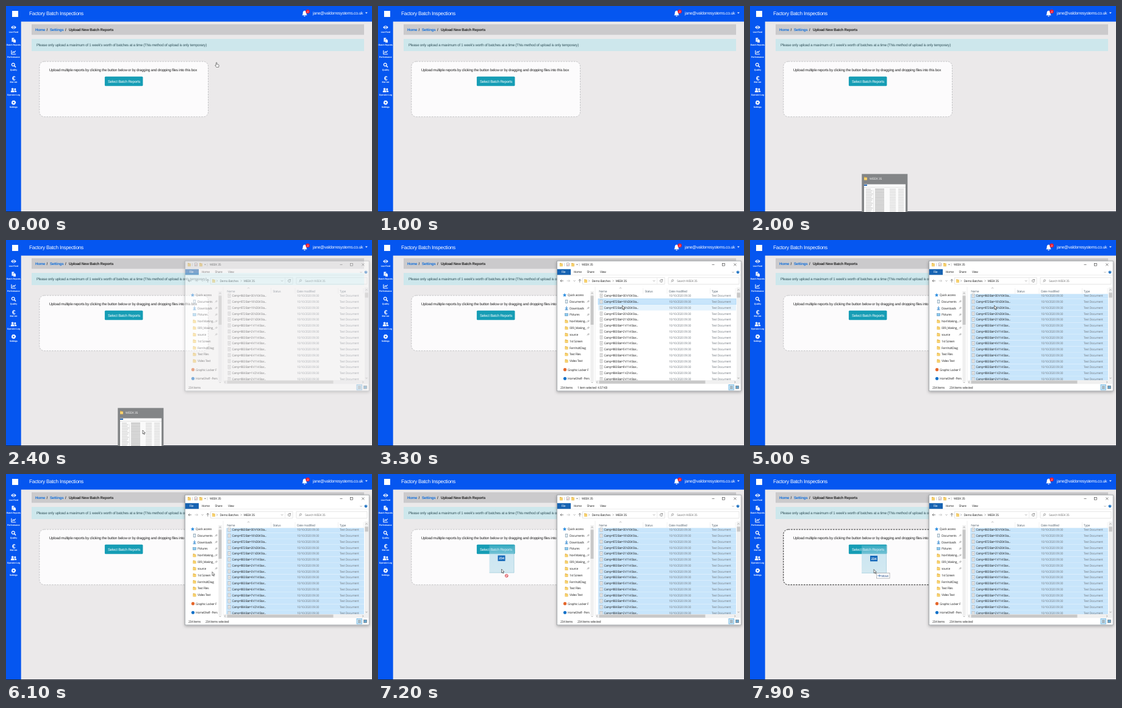
An HTML page for the animation above (8 s loop, 600 by 338 pixels).

```html
<!DOCTYPE html>
<html lang="en">
<head>
<meta charset="utf-8">
<title>Batch report upload</title>
<style>
html, body { margin: 0; width: 100%; height: 100%; overflow: hidden; background: #ebe9ea; }
svg { display: block; width: 600px; height: 338px; }
text { font-family: "Liberation Sans", Arial, sans-serif; letter-spacing: -.035em; text-rendering: geometricPrecision; white-space: pre; }
#explorer text { font-family: "Open Sans", "Noto Sans", sans-serif; letter-spacing: -.056em; }
#explorer .name { letter-spacing: -.085em; }
</style>
</head>
<body>
<svg id="stage" viewBox="0 0 600 338"></svg>
<script>
const LOOP = 8000, BLUE = '#0556f0', TEAL = '#169db5', FOLDER = '#f7d370';
const FIRST_ROW = 91.5, ROW_STEP = 9.75;

const text = (x, y, s, size, fill = '#222', more = '') =>
  `<text x="${x}" y="${y}" font-size="${size}" fill="${fill}" ${more}>${s}</text>`;
const rect = (x, y, w, h, fill, more = '') =>
  `<rect x="${x}" y="${y}" width="${w}" height="${h}" fill="${fill}" ${more}/>`;
const line = (d, color, w = .6, more = '') =>
  `<path d="${d}" fill="none" stroke="${color}" stroke-width="${w}" ${more}/>`;
const shape = (d, fill, more = '') => `<path d="${d}" fill="${fill}" ${more}/>`;
const dot = (x, y, r, fill, more = '') => `<circle cx="${x}" cy="${y}" r="${r}" fill="${fill}" ${more}/>`;
const group = (id, body, more = '') => `<g id="${id}" ${more}>${body}</g>`;
const at = (x, y, body) => `<g transform="translate(${x} ${y})">${body}</g>`;
const body = (x, y, s, fill = '#222', more = '') => text(x, y, s, 6.1, fill, more);
const small = (x, y, s, fill = '#222') => text(x, y, s, 5, fill);
const folder = (x, y) =>
  shape(`M${x - 2.4} ${y - 2.6}h2l.6 .8h2.2v4.6h-4.8z`, '#e3b044') + rect(x - 2.4, y - 1.2, 4.8, 3.6, FOLDER);
const chevron = (x, y, d = 1) => line(`M${x - 1.5} ${y - d * .7}l1.5 ${d * 1.5}l1.5 ${-d * 1.5}`, '#555', .5);

// Sidebar icons, drawn around 0,0
const icons = [
  shape('M-4.3 0Q0-5.6 4.3 0Q0 5.6-4.3 0z', '#fff') + dot(0, 0, 1.9, BLUE) + dot(0, 0, 1.1, '#fff'),
  shape('M-3-3.8h3.8v1.6h-1.6v5h-2.2z', '#fff') + shape('M-.4-1.6h2.3l1.5 1.5v4h-3.8z', '#fff'),
  line('M-3.5-3.2v6.2h7.2M-2 1l1.6-2l1.4 1.2l2.2-2.7', '#fff', 1.1),
  line('M1 .9l2.6 2.7', '#fff', 1.5) + dot(-.7, -.8, 2.4, 'none', 'stroke="#fff" stroke-width="1.2"'),
  text(0, 3.6, '€', 10, '#fff', 'text-anchor="middle" font-weight="bold"'),
  dot(-1.8, -1.8, 1.8, '#fff') + dot(2.4, -1.6, 1.5, '#fff') +
    shape('M-4.6 3.6v-1.3q0-2 2-2h1.6q2 0 2 2v1.3zM1.6 3.2v-1.2q0-1-.6-1.6h2q1.7 0 1.7 1.7v1.1z', '#fff'),
  dot(0, 0, 2.9, '#fff', 'stroke="#fff" stroke-width="1.6" stroke-dasharray="1.5 .78"') + dot(0, 0, 1.2, BLUE)
];
const labels = ['Live Feed', 'Batch Reports', 'Performance', 'Quality', 'Mat Vat', 'Operator Log', 'Settings'];

function page() {
  const bold = 'font-weight="bold"', centred = 'text-anchor="middle"';
  return rect(0, 0, 600, 338, '#ebe9ea') +
    rect(0, 0, 24.7, 338, BLUE) + rect(0, 0, 600, 25.6, BLUE) + rect(0, 337, 600, 1, '#222936') +
    rect(10, 8, 10, 10, '#fff') +
    text(38, 14.8, 'Factory Batch Inspections', 8.4, '#fff') +
    shape('M485.2 15.2q1.5-1.2 1.5-4.2q0-2.8 2.8-3.4q2.8 .6 2.8 3.4q0 3 1.5 4.2zM488 16h3q-1.5 2.6-3 0z', '#fff') +
    dot(494.6, 9, 3.3, '#ec1c30') + text(494.6, 10.6, '2', 4.5, '#fff', centred) +
    text(503, 14.3, 'jane@valdorresystems.co.uk', 6.9, '#fff') +
    shape('M588.8 10.4h4l-2 2.2z', '#fff') +
    icons.map((icon, i) => at(12.5, [35, 56, 76, 97, 118, 138, 158.5][i], icon) +
      text(12.4, 44.4 + i * 20.5, labels[i], 3.6, '#fff', centred + ' font-weight="bold"')).join('') +
    rect(42, 30, 545, 17.3, '#cbcacc') +
    body(48, 40.7, 'Home', '#1470da', bold) + body(66.4, 40.7, '/', '#333', bold) +
    body(72, 40.7, 'Settings', '#1470da', bold) + body(97, 40.7, '/', '#333', bold) +
    body(103, 40.7, 'Upload New Batch Reports', '#252525', bold) +
    rect(42, 54, 545, 20, '#cde7ec') +
    body(50, 66, "Please only upload a maximum of 1 week's worth of batches at a time (This method of upload is only temporary)", '#33535b') +
    rect(54.8, 91, 276.7, 90.8, '#fcfbfc', 'id="drop" rx="8" stroke-width="1" stroke-dasharray="2.6 1.7"') +
    body(70.8, 106.7, 'Upload multiple reports by clicking the button below or by dragging and dropping files into this box') +
    rect(161.9, 115.7, 62.5, 15.5, TEAL, 'rx="1.5"') +
    body(167, 125.9, 'Select Batch Reports', '#fff');
}

function preview() {
  let out = rect(183.3, 275.6, 75, 63, '#838587') + folder(189.5, 283) +
    text(196, 285, 'WEEK 35', 4.9, '#f2f2f2') + rect(187, 292.5, 68, 46, '#fafafa') +
    rect(187, 293, 5, 2, '#2667b5') + rect(187, 297, 68, .5, '#ccc') + rect(202.5, 302, .4, 36, '#ccc');
  for (let y = 300; y < 337; y += 2.6) {
    out += rect(190, y, 8 + y % 4, .8, '#bbb') + rect(205, y, 15, 1, '#999') +
      rect(229, y, 10, .8, '#c4c4c4') + rect(243, y, 9, .8, '#c4c4c4');
  }
  return out;
}

function fileName(i) {
  const [camp, bat, vat] = i == 0 ? [860, 30, 104] : i < 5 ? [872, 17 + i, 204] :
    i < 13 ? [883, i - 4, 114] : [884, i - 12, i == 13 ? 214 : 114];
  return `Camp=${camp} Bat=${bat} V${vat} Sta${bat < 10 ? 'r' : ''}...`;
}

function fileList() {
  let out = '';
  for (let i = 0; i < 15; i++) {
    const y = FIRST_ROW + i * ROW_STEP, top = i ? y - 4.8 : 88.5;
    out += rect(361, top, 226, y + 4.7 - top, '#fff', 'class="row" stroke-width=".5"') +
      rect(364, y - 2.8, 4, 5.6, '#f8f8f8', 'stroke="#999" stroke-width=".5"') +
      line(`M365 ${y - 1.2}h2m-2 1.2h2m-2 1.2h2`, '#999', .4) +
      text(370.5, y + 1.8, fileName(i), 4.95, '#222', 'class="name"') +
      small(477, y + 1.8, '10/10/2020 09:30', '#747b82') + small(547, y + 1.8, 'Text Document', '#747b82');
  }
  return out;
}

function navPane() {
  const names = ['Documents', 'Downloads', 'Pictures', 'No4 Making...', '009_Making_', 'source',
    '1st Screen', 'FernholtDiag', 'Text Files', 'Video Text'];
  const symbols = [
    (x, y) => rect(x - 1.8, y - 2.6, 3.6, 5.2, '#e8f0f6', 'stroke="#68889d" stroke-width=".6"'),
    (x, y) => line(`M${x} ${y - 2.8}v4.2m-2-2l2 2l2-2M${x - 2.4} ${y + 2.6}h4.8`, '#1979ca', 1),
    (x, y) => rect(x - 2.6, y - 2, 5.2, 4, '#8cc8ee', 'stroke="#4c87ad" stroke-width=".5"')
  ];
  const pin = y => line(`M342.8 ${y + 1.6}l1.4-1.4m-.8-1.2l2 2m-1.4-1.6l1.4-1.2l1 1l-1.2 1.4`, '#777', .6);
  return shape('M306 87l.9 2.2l2.3 .2l-1.8 1.5l.6 2.3l-2-1.3l-2 1.3l.6-2.3l-1.8-1.5l2.3-.2z', '#2b8de0') +
    small(310.8, 92, 'Quick access') +
    names.map((name, i) => {
      const y = 101 + i * 10.82;
      return (symbols[i] || folder)(309, y) + small(314, y + 1.8, name) + (i < 6 ? pin(y) : '');
    }).join('') +
    dot(306.5, 212.7, 2.6, '#e5672c') + small(311, 214.5, 'Graphic Locker F') +
    dot(306.5, 227.3, 2.6, '#1673c9') + small(311, 229.1, 'HomeShelf - Pers') +
    rect(348.3, 84, 5.4, 148, '#f0f0f0') + rect(348.5, 91.5, 5, 47.5, '#c8c8c8') +
    chevron(351, 87.5, -1) + chevron(351, 233.5);
}

function explorer() {
  const frame = 'stroke="#d5d5d5" stroke-width=".6"';
  return rect(293.5, 34.3, 301.7, 213.5, '#fff', 'stroke="#8f9499" stroke-width=".7" filter="url(#shadow)"') +
    at(0, -.6, folder(300.3, 41) + line('M305.5 38.5v5M330 38.5v5', '#aaa', .5) +
      rect(309.5, 38.4, 4, 5, '#fff', 'stroke="#777" stroke-width=".5"') + line('M310.3 41l1 1l1.6-2', '#c33', .6) +
      folder(319.5, 41) + shape('M325 40.3h2.8l-1.4 1.6z', '#555') + small(334, 43, 'WEEK 35') +
      line('M547.5 41h4M583.3 39l4 4m0-4l-4 4', '#333', .6) +
      rect(564.5, 39, 3.8, 3.8, 'none', 'stroke="#333" stroke-width=".6"')) +
    rect(293.8, 47.8, 22.2, 9.6, '#1763b2') + small(300.5, 54.4, 'File', '#fff') +
    small(320.7, 54.4, 'Home') + small(342.5, 54.4, 'Share') + small(364, 54.4, 'View') +
    chevron(582, 52.8) + dot(590, 52.8, 2.4, '#1a6fc0') + text(590, 54.4, '?', 4.3, '#fff', 'text-anchor="middle"') +
    rect(294, 57.4, 301, .5, '#dadada') +
    line('M304 67h-5m2-2l-2 2l2 2', '#333', .6) + line('M309.5 67h5m-2-2l2 2l-2 2', '#aaa', .6) +
    chevron(322, 67) + line('M330.8 69.6v-5m-2 2l2-2l2 2', '#333', .6) +
    rect(335.5, 61.8, 134.5, 10.5, '#fff', frame) + folder(340.5, 67) +
    line('M345.2 65.5l1.5 1.5l-1.5 1.5M384.8 65.5l1.5 1.5l-1.5 1.5', '#555', .5) +
    small(350.5, 68.8, 'Demo Batches') + small(389.5, 68.8, 'WEEK 35') + chevron(452.5, 67) +
    line('M457.5 62v10', '#ddd', .5) + line('M466 65.6a2.1 2.1 0 1 0 .5 1.8M466.4 64.3v1.7h-1.7', '#444', .6) +
    rect(476, 61.8, 116, 10.5, '#fff', frame) + dot(483, 66.4, 1.5, 'none', 'stroke="#555" stroke-width=".5"') +
    line('M482 67.5l-1.6 1.6', '#555', .6) + small(490, 68.8, 'Search WEEK 35', '#777') +
    line('M356 77v156', '#ddd', .5) + chevron(397.5, 78.8, -1) +
    ['Name', 'Status', 'Date modified', 'Type'].map((s, i) => small([362.3, 437.5, 477, 547][i], 85.6, s, '#53616e')).join('') +
    line('M434.5 79v9M474 79v9M544.5 79v9M586 79v9', '#e0e0e0', .5) +
    navPane() + fileList() +
    rect(588, 78, 6.4, 152, '#f0f0f0') + rect(588.4, 86.5, 5.4, 8, '#c8c8c8') +
    chevron(591, 82, -1) + chevron(591, 226.5) +
    rect(357, 230, 237, 6.2, '#f0f0f0') + rect(362.5, 230.6, 174, 5, '#c8c8c8') +
    line('M359.8 231.7l-1.4 1.5l1.4 1.5M584.4 231.7l1.4 1.5l-1.4 1.5', '#555', .5) +
    small(299, 243.8, '234 items') + `<text id="status" x="327" y="243.8" font-size="5" fill="#222"></text>` +
    rect(575, 237.4, 8.6, 8.6, '#cce8f8', 'stroke="#3d9bd8" stroke-width=".6"') +
    line('M577 240h4.8m-4.8 1.8h4.8m-4.8 1.8h4.8', '#555', .6) +
    rect(586.5, 239.2, 4.8, 4.8, '#69a6cf', 'stroke="#555" stroke-width=".5"');
}

const dragImage = rect(-20, -39.5, 40.5, 45.5, 'url(#glass)') + line('M-20 6h40.5v-45.5', '#8fc3d6', .6) +
  rect(-6, -22.4, 12, 9.2, '#1267b9') + text(0, -16, '234', 5.4, '#fff', 'text-anchor="middle" font-weight="bold"');
const noDrop = dot(8.3, 11, 2.3, '#fff', 'stroke="#d52b35" stroke-width="1"') + line('M6.8 9.5l3 3', '#d52b35', 1);
const moveTip = rect(4.4, 6, 21.6, 8.6, '#fff', 'stroke="#8b8d91" stroke-width=".6"') +
  line('M6.2 10.4h4.6m-1.9-1.9l1.9 1.9l-1.9 1.9', '#1b59a4', .8) + small(12.3, 12.2, 'Move', '#234a87');
const hand = shape('M-.6 0q.8-.8 1.5 0v2.7l2.6 .6q.8 .3 .6 1.3l-.5 2.8h-3.8l-2-3q.2-1 1.6 0z', '#fff', 'stroke="#333" stroke-width=".6"');
const arrow = shape('M0 0v6.2l1.4-1.3l1 2.3l1-.5l-1-2.2h1.9z', '#fff', 'stroke="#222" stroke-width=".6"');

const stage = document.getElementById('stage');
stage.innerHTML = `<defs>
  <filter id="shadow" x="-5%" y="-5%" width="110%" height="112%"><feDropShadow dx="0" dy="1.5" stdDeviation="2.5" flood-opacity=".35"/></filter>
  <linearGradient id="glass" x2="0" y2="1"><stop stop-color="#a9d8ea" stop-opacity=".2"/><stop offset=".35" stop-color="#b5dcec" stop-opacity=".65"/><stop offset="1" stop-color="#c9e4ee" stop-opacity=".8"/></linearGradient>
  </defs>` + page() + group('preview', preview()) + group('explorer', explorer()) +
  group('pointer', group('drag', dragImage + group('noDrop', noDrop) + group('moveTip', moveTip)) +
    group('hand', hand) + group('arrow', arrow));

const el = id => document.getElementById(id);
const rows = [...document.querySelectorAll('.row')];
const show = (id, on) => el(id).setAttribute('display', on ? 'inline' : 'none');

// time, x, y of the pointer tip
const path = [[0, 345, 93], [100, 345, 93], [800, 224, 346], [2000, 224, 346], [2200, 224, 316],
  [2400, 224, 312], [2800, 380, 170], [3000, 400, 100], [3100, 400, 100], [3200, 400.5, 107.5],
  [5800, 400.5, 107.5], [6100, 338, 160.5], [6700, 245, 164], [7200, 202.5, 156], [7600, 202.5, 156],
  [7700, 203, 156.5], [8000, 203, 156.5]];

function pointerAt(t) {
  const i = path.findIndex(p => p[0] > t), [t0, x0, y0] = path[i - 1], [t1, x1, y1] = path[i];
  const k = (t - t0) / (t1 - t0);
  return [x0 + (x1 - x0) * k, y0 + (y1 - y0) * k];
}

function draw(now) {
  const t = Math.floor(now % LOOP / 100) * 100;
  const [x, y] = pointerAt(t);
  const all = t >= 3800, over = t >= 7500, opened = Math.min(1, (t - 2300) / 200);
  el('pointer').setAttribute('transform', `translate(${x} ${y})`);
  show('hand', t < 800);
  show('arrow', t >= 800);
  show('drag', t >= 6200);
  show('noDrop', !over);
  show('moveTip', over);
  show('preview', t >= 2000 && t < 2600);
  show('explorer', t >= 2400);
  el('explorer').setAttribute('opacity', Math.max(0, opened));
  el('drop').setAttribute('stroke', over ? '#1c1c1c' : '#c2c2c4');

  const hover = x > 361 ? Math.floor((y - FIRST_ROW + 4.8) / ROW_STEP) : -1;
  rows.forEach((row, i) => {
    const picked = all || t >= 3100 && i == 1;
    row.setAttribute('fill', picked ? '#c8e5fb' : i == hover ? '#e5f3fd' : '#fff');
    row.setAttribute('stroke', picked && !all ? '#8fc8f2' : 'none');
  });
  el('status').textContent = all ? '234 items selected' : t >= 3100 ? '1 item selected  4.57 KB' : '';
  requestAnimationFrame(draw);
}
requestAnimationFrame(draw);
</script>
</body>
</html>
```
